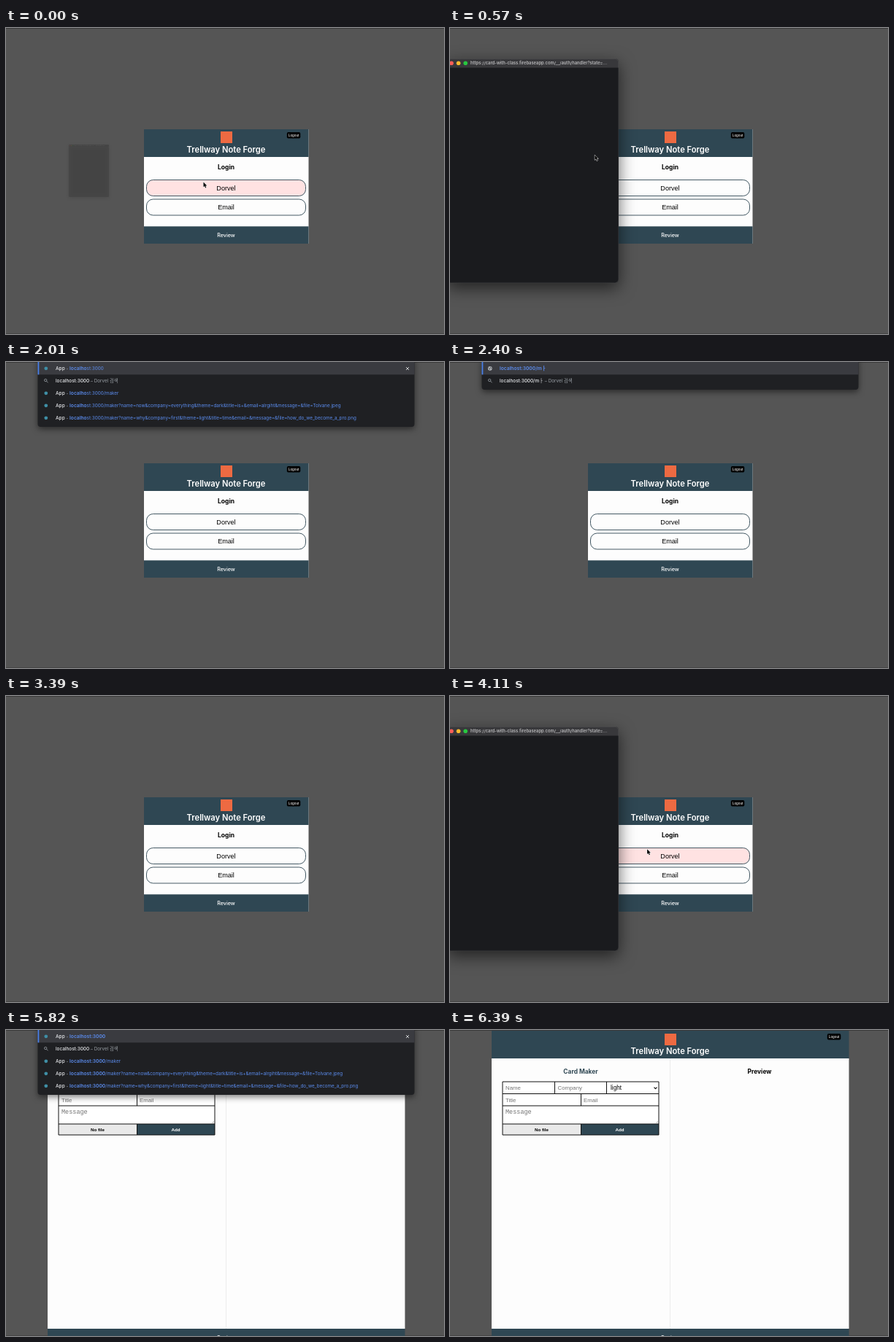
An HTML page with a canvas that plays this animation: 600 px wide and 420 px high, repeating every 6.6 s.

```html
<!DOCTYPE html>
<html lang="en">
<head>
<meta charset="utf-8">
<title>Card app</title>
<style>
html, body { margin: 0; width: 100%; height: 100%; overflow: hidden; background: #555; }
canvas { display: block; width: 600px; height: 420px; }
</style>
</head>
<body>
<canvas id="stage"></canvas>
<script>
const W = 600, H = 420, LOOP = 6600, STEP = 30;
const SLATE = '#2f4753', PAPER = '#fdfdfd', PINK = '#ffe2e2', BLUE = '#5b8cee';
const UI = 'Inter, "Noto Sans CJK KR", "Noto Sans CJK", sans-serif';
const ARIAL = '"Liberation Sans", Arial, sans-serif';
const MONO = '"Liberation Mono", "Courier New", monospace';
const APP = 'Trellway Note Forge', BRAND = 'Dorvel';

const canvas = document.getElementById('stage');
const ratio = window.devicePixelRatio || 1;
canvas.width = W * ratio;
canvas.height = H * ratio;
const c = canvas.getContext('2d');

const clamp = v => Math.max(0, Math.min(1, v));
const smooth = p => p * p * (3 - 2 * p);

function rect(x, y, w, h, fill) {
  c.fillStyle = fill;
  c.fillRect(x, y, w, h);
}

function round(x, y, w, h, r, fill, stroke, width = 1) {
  c.beginPath();
  c.roundRect(x, y, w, h, r);
  if (fill) { c.fillStyle = fill; c.fill(); }
  if (stroke) { c.strokeStyle = stroke; c.lineWidth = width; c.stroke(); }
}

function dot(x, y, r, fill) {
  c.beginPath();
  c.arc(x, y, r, 0, Math.PI * 2);
  c.fillStyle = fill;
  c.fill();
}

function line(points, stroke, width) {
  c.beginPath();
  points.forEach(([x, y], i) => i ? c.lineTo(x, y) : c.moveTo(x, y));
  c.strokeStyle = stroke;
  c.lineWidth = width;
  c.stroke();
}

// Draws text and returns the x where it ends.
function text(str, x, y, font, fill, align = 'left') {
  c.font = font;
  c.fillStyle = fill;
  c.textAlign = align;
  c.fillText(str, x, y);
  return x + c.measureText(str).width;
}

// ---- pages ----

function banner(x, y, w, h, logoY, logoutX, logoutY) {
  rect(x, y, w, h, SLATE);
  rect(294, logoY, 16, 16, '#ed6a42');
  text(APP, 301.5, y + h - 6.2, '600 11.2px ' + UI, '#fff', 'center');
  round(logoutX, logoutY, 18.5, 8.5, 2, '#000');
  text('Logout', logoutX + 9.25, logoutY + 6, '4.8px ' + ARIAL, '#fff', 'center');
}

function footer(x, y, w, h) {
  rect(x, y, w, h, SLATE);
  text('Review', 301.5, y + 15, '500 7.2px ' + UI, '#fff', 'center');
}

function loginPage(hover) {
  rect(189, 139, 225.5, 157, PAPER);
  banner(189, 139, 225.5, 38, 142, 384.8, 143);
  text('Login', 301.5, 193.8, '700 8.5px ' + UI, '#000', 'center');
  [[BRAND, 208.5], ['Email', 235]].forEach(([label, y], i) => {
    round(192.5, y, 218, 22, 9, i === 0 && hover ? PINK : PAPER, SLATE, 0.9);
    text(label, 301.5, y + 14.2, '9.1px ' + ARIAL, '#000', 'center');
  });
  footer(189, 272.3, 225.5, 23.7);
}

function form() {
  const hint = (str, x, y) => text(str, x, y, '7.8px ' + ARIAL, '#757575');
  rect(72, 71, 214, 58, '#fff');
  rect(72, 129, 107.5, 15, '#e9e9e9');
  rect(179.5, 129, 106.5, 15, SLATE);
  c.strokeStyle = '#111';
  c.lineWidth = 1;
  c.strokeRect(72, 71, 214, 73);
  for (const y of [87.5, 104, 129]) line([[72, y], [286, y]], '#111', 1);
  for (const x of [143.5, 214.5]) line([[x, 71], [x, 87.5]], '#111', 1);
  line([[179.5, 87.5], [179.5, 104]], '#111', 1);
  line([[179.5, 129], [179.5, 144]], '#111', 1);
  hint('Name', 76, 82);
  hint('Company', 147.5, 82);
  hint('Title', 76, 98.6);
  hint('Email', 183, 98.6);
  text('light', 220, 82, '8.2px ' + ARIAL, '#000');
  line([[279.5, 78.7], [281.5, 80.7], [283.5, 78.7]], '#000', 1.1);
  text('Message', 76, 115.3, '8.5px ' + MONO, '#757575');
  line([[282, 128], [285, 125]], '#888', 0.5);
  line([[283.8, 128], [285, 126.8]], '#888', 0.5);
  text('No file', 125.5, 138.8, '700 6.2px ' + ARIAL, '#000', 'center');
  text('Add', 232.5, 138.8, '700 6.2px ' + ARIAL, '#fff', 'center');
}

function makerPage() {
  rect(57, 39, 489.5, 371, PAPER);
  banner(57, 1, 489.5, 38, 5, 516.8, 5);
  rect(301, 39, 1, 371, '#ececec');
  text('Card Maker', 179, 59.8, '700 8.4px ' + UI, SLATE, 'center');
  text('Preview', 424, 59.8, '700 8.4px ' + UI, '#000', 'center');
  form();
  footer(57, 410, 489.5, 10);
}

// ---- sign-in window ----

function popup(scale, alpha) {
  const x = -4, y = 42, w = 235, h = 308;
  c.save();
  c.globalAlpha = alpha;
  c.translate(113.5, 196);
  c.scale(scale, scale);
  c.translate(-113.5, -196);
  c.shadowColor = 'rgba(0,0,0,0.6)';
  c.shadowBlur = 22 * scale * ratio;
  c.shadowOffsetY = 7 * scale * ratio;
  round(x, y, w, h, 5, '#1a1b1e');
  c.shadowColor = 'transparent';
  round(x, y, w, 12.5, [5, 5, 0, 0], '#38383b');
  round(x + 0.25, y + 0.25, w - 0.5, h - 0.5, 5, null, 'rgba(150,150,150,0.35)', 0.5);
  ['#fe5f57', '#febc2e', '#28c840'].forEach((col, i) => dot(2 + i * 9.6, 48.2, 2.8, col));
  text('https://card-with-class.firebaseapp.com/__/auth/handler?state=...', 28, 50.4,
    '600 5.8px ' + UI, '#b9b9bb');
  c.restore();
}

function popups(t) {
  for (const [open, close, span] of [[-30, 750, 90], [3750, 4860, 150]]) {
    if (t < open || t > close + span) continue;
    const p = clamp((t - open) / 240), q = clamp((t - close) / span);
    popup((0.2 + 0.8 * smooth(p)) * (1 - 0.08 * q), clamp(p * 1.3) * (1 - q));
  }
}

// ---- address bar suggestions ----

const HOST = 'localhost:3000';
const HISTORY = [
  HOST,
  HOST + '/maker',
  HOST + '/maker?name=now&company=everything&theme=dark&title=is+&email=alrgiht&message=&file=Tolvane.jpeg',
  HOST + '/maker?name=why&company=first&theme=light&title=time&email=&message=&file=how_do_we_become_a_pro.png'
];

function lens(y) {
  c.beginPath();
  c.arc(54.2, y - 0.8, 1.7, 0, Math.PI * 2);
  c.strokeStyle = '#9aa0a6';
  c.lineWidth = 0.8;
  c.stroke();
  line([[55.5, y + 0.5], [57.5, y + 2.5]], '#9aa0a6', 0.9);
}

function globe(y) {
  dot(54.8, y, 2.9, '#b4b8bd');
  line([[52.6, y - 0.8], [54.5, y + 0.2], [54.2, y + 2]], '#3a3b3f', 0.8);
  line([[55.2, y - 2], [56.2, y], [57.2, y + 0.2]], '#3a3b3f', 0.8);
}

function suggestions(typed) {
  const hits = HISTORY.filter(h => h.startsWith(typed));
  const rows = hits.length + 1 + (hits.length ? 0 : 1);
  const h = rows * 17 + 4;
  const bold = '600 6.7px ' + UI, plain = '6.3px ' + UI;
  c.save();
  c.shadowColor = 'rgba(0,0,0,0.5)';
  c.shadowBlur = 8 * ratio;
  c.shadowOffsetY = 3 * ratio;
  round(43.5, -6, 516, h + 6, 4, '#1f2023');
  c.restore();
  rect(43.5, 0, 516, 17.3, '#3a3b40');
  rect(43.5, 0, 1.8, 17.3, '#4a80e8');

  const past = (url, y) => {
    dot(54.8, y - 2.4, 2.4, '#3f8fa6');
    let x = text('App', 68, y, '500 6.5px ' + UI, '#e8eaed');
    x = text(' - ', x, y, plain, '#9aa0a6');
    x = text(typed, x, y, bold, BLUE);
    text(url.slice(typed.length), x, y, plain, BLUE);
  };

  if (hits.length) {
    past(hits[0], 11.2);
    line([[548, 7], [552, 11]], '#d5d7da', 0.9);
    line([[552, 7], [548, 11]], '#d5d7da', 0.9);
  } else {
    globe(8.8);
    text(typed, 68, 11.2, bold, BLUE);
  }
  lens(25.8);
  const full = HOST.startsWith(typed) ? HOST : typed;
  const end = text(full, 68, 28.2, '500 6.4px ' + UI, '#e8eaed');
  text(' – ' + BRAND + ' 검색', end, 28.2, plain, '#9aa0a6');
  hits.slice(1).forEach((url, i) => past(url, 45.2 + i * 17));
}

// Later edits of the address: [time, path after the host]
const EDITS = [[2280, '/'], [2340, '/m'], [2400, '/mㅏ'], [2520, '/m'], [2580, '/ma'],
  [2640, '/mak'], [2700, '/make'], [2760, '/maker']];

function typedAt(t) {
  if (t >= 1830 && t < 2850) {
    const edit = EDITS.filter(e => e[0] <= t).pop();
    return edit ? HOST + edit[1] : HOST.slice(0, 1 + (t - 1830) / 30);
  }
  if (t >= 5490 && t < 6000) return HOST.slice(0, 1 + (t - 5490) / 24);
  return '';
}

// ---- pointer ----

const PATHS = [
  [[0, 270.5, 211.5], [90, 270.5, 211.5], [690, 190, 170], [990, 190, 170],
    [1290, 525, 9], [1440, 525, 9], [1680, 272, -12]],
  [[3420, 284, 62], [3600, 270.5, 211.5], [4080, 270.5, 211.5], [4740, 208, 11.5],
    [4860, 208, 11.5], [5010, 206, -12]]
];

function pointerAt(t) {
  for (const path of PATHS) {
    for (let i = 1; i < path.length; i++) {
      const [t0, x0, y0] = path[i - 1], [t1, x1, y1] = path[i];
      if (t < t0 || t >= t1) continue;
      const p = smooth((t - t0) / (t1 - t0));
      return { x: x0 + (x1 - x0) * p, y: y0 + (y1 - y0) * p };
    }
  }
  return null;
}

function shape(points, x, y, fill, stroke) {
  c.beginPath();
  points.forEach(([px, py]) => c.lineTo(x + px, y + py));
  c.closePath();
  c.lineJoin = 'round';
  c.lineWidth = 1;
  c.strokeStyle = stroke;
  c.stroke();
  c.fillStyle = fill;
  c.fill();
}

const ARROW = [[0, 0], [0, 6.8], [1.6, 5.4], [2.7, 8], [3.8, 7.5], [2.7, 5], [4.8, 4.9]];
const HAND = [[0, -1], [1, -1], [1.2, 1.5], [4, 2.2], [4.2, 4.5], [3.3, 6.5], [0.2, 6.5],
  [-2, 3.5], [-1.3, 3], [0, 4]];

const inside = (p, x, y, w, h) => p && p.x >= x && p.x <= x + w && p.y >= y && p.y <= y + h;

// ---- timeline ----

const PAGES = [[0, 'login'], [720, 'maker'], [1440, 'login'], [2850, ''], [2970, 'login'],
  [4770, 'maker'], [6030, ''], [6060, 'login'], [6150, 'maker']];

function draw(t) {
  c.setTransform(ratio, 0, 0, ratio, 0, 0);
  rect(0, 0, W, H, '#555');
  rect(0, 0, W, 1, '#3a3a3a');
  rect(0, 419, W, 1, '#444');
  const page = PAGES.filter(p => p[0] <= t).pop()[1];
  const at = pointerAt(t);
  if (page === 'login') loginPage(at && at.x > 231 && inside(at, 192, 208, 219, 23));
  if (page === 'maker') makerPage();
  popups(t);
  const typed = typedAt(t);
  if (typed) suggestions(typed);
  if (!at) return;
  if (page === 'maker' && inside(at, 517, 5, 18.5, 8.5)) shape(HAND, at.x, at.y, '#fff', '#000');
  else shape(ARROW, at.x, at.y, '#000', '#fff');
}

const start = performance.now();
function tick() {
  const t = (performance.now() - start) % LOOP;
  draw(Math.floor(t / STEP) * STEP);
  requestAnimationFrame(tick);
}
tick();
</script>
</body>
</html>
```
